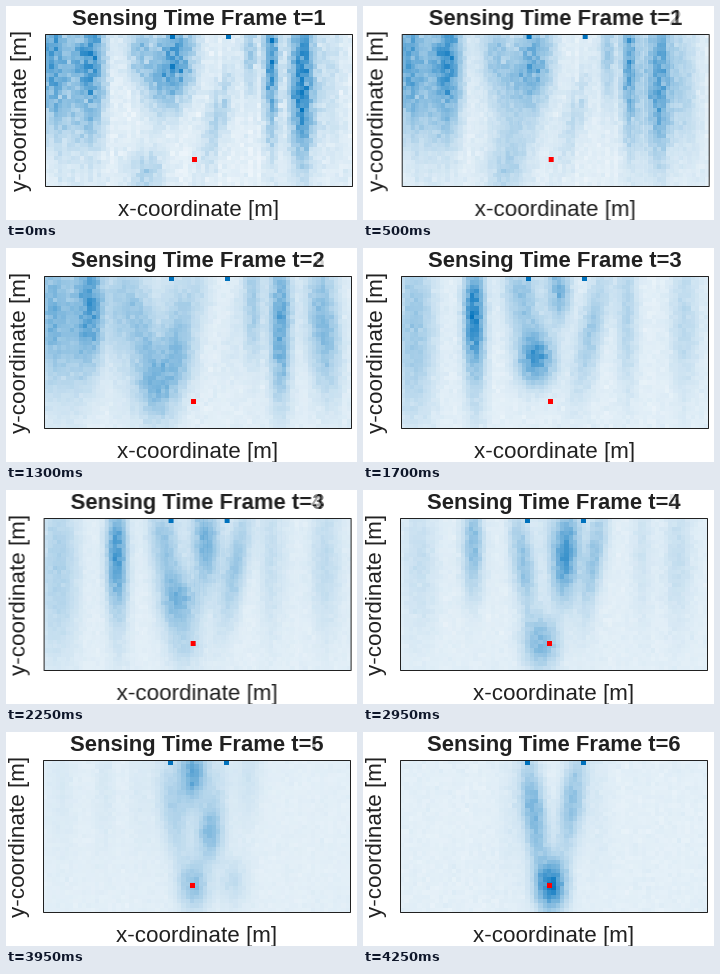
Write a matplotlib script that moves like this. It is 351 by 214 pixels and loops after 6.25 s.

```python
import numpy as np
import matplotlib.pyplot as plt
from matplotlib.animation import FuncAnimation
from matplotlib.patches import Rectangle

W, H = 351, 214
LEFT, TOP, BW, BH = 39, 28, 307, 152
COLS, ROWS = 71, 35
BLUE = np.array([0, 0.447, 0.741])
INK = "#212121"
STEP = 50             # ms per frame
HOLD, FADE = 7, 10    # frames of rest and of cross-fade
SCENES = 6

rng = np.random.default_rng(4)
gx, gy = np.meshgrid(LEFT + (np.arange(COLS) + 0.5) * BW / COLS,
                     TOP + (np.arange(ROWS) + 0.5) * BH / ROWS)


def blob(amp, x, y, sx, sy, slant=0):
    """Gaussian plume; slant is the sideways drift per pixel downwards."""
    u = (gx - x - slant * (gy - y)) / sx
    return amp * np.exp(-(u * u + ((gy - y) / sy) ** 2) / 2)


def field(t):
    if t == 1:
        return (blob(.48, 45, 50, 8, 48) + blob(.54, 86, 55, 9, 50)
                + blob(.3, 65, 65, 12, 52) + blob(.3, 135, 45, 10, 30, .15)
                + blob(.64, 168, 58, 13, 28, -.1) + blob(.2, 139, 166, 12, 16)
                + blob(.2, 212, 108, 8, 35, -.22) + blob(.26, 244, 45, 5, 30)
                + blob(.62, 265, 55, 5, 52) + blob(.72, 296, 75, 8, 54)
                + blob(.12, 322, 65, 9, 52))
    if t == 2:
        return (blob(.42, 46, 60, 10, 50) + blob(.68, 86, 55, 9, 42)
                + blob(.26, 68, 80, 11, 50) + blob(.34, 132, 70, 12, 38, .15)
                + blob(.42, 151, 135, 15, 28) + blob(.28, 176, 80, 11, 40, -.1)
                + blob(.3, 248, 55, 6, 42) + blob(.62, 276, 75, 7, 54)
                + blob(.42, 318, 75, 11, 48, .08))
    if t == 3:
        return (blob(.28, 52, 80, 14, 62) + blob(.74, 112, 65, 7, 36)
                + blob(.12, 114, 130, 8, 40)
                + blob(.3, 160, 50, 12, 30, .1) + blob(.4, 197, 42, 8, 22)
                + blob(.6, 174, 110, 12, 18)
                + blob(.24, 230, 80, 9, 46, -.2) + blob(.2, 265, 65, 7, 52)
                + blob(.16, 323, 70, 10, 50))
    if t == 4:
        return (blob(.12, 59, 70, 12, 52) + blob(.38, 112, 55, 7, 34)
                + blob(.31, 162, 72, 8, 36, .12) + blob(.66, 205, 63, 9, 29, -.08)
                + blob(.31, 233, 68, 7, 38, -.15) + blob(.42, 180, 153, 12, 17)
                + blob(.09, 281, 60, 7, 48) + blob(.13, 317, 65, 10, 48))
    if t == 5:
        return (blob(.85, 189, 40, 9, 21) + blob(.48, 206, 102, 9, 17)
                + blob(.2, 229, 150, 10, 17) + blob(.13, 162, 70, 7, 36, .1)
                + blob(.12, 245, 45, 9, 30) + blob(.08, 101, 60, 7, 42)
                + blob(.06, 57, 60, 11, 45) + blob(.06, 135, 60, 7, 42))
    return (blob(.42, 173, 80, 8, 35, .1) + blob(.32, 211, 70, 8, 35, -.12)
            + blob(.76, 190, 153, 10, 17)
            + blob(.04, 150, 80, 9, 50) + blob(.04, 236, 70, 9, 50))


def heat(t):
    noise = rng.standard_normal((2, ROWS, COLS))
    v = 0.11 + field(t) * (1 + (0.06 + 0.14 / t) * noise[0])
    v += (0.006 + 0.014 / t) * noise[1]
    v += 0.01 / t * rng.standard_normal(COLS)
    return 1 - np.clip(v, 0.07, 1)[..., None] * (1 - BLUE)


fig = plt.figure(figsize=(W / 100, H / 100), dpi=100, facecolor="white")
ax = fig.add_axes([0, 0, 1, 1])


def stage():
    ax.clear()
    ax.axis("off")


def limits():
    ax.set(xlim=(0, W), ylim=(H, 0), aspect="auto")


def label(x, y, s, px, **kw):
    ax.text(x, y, s, fontsize=px * 0.72, family="Liberation Sans", color=INK,
            ha="center", va="baseline", rotation_mode="anchor", **kw)


def square(x, y, size, color):
    ax.add_patch(Rectangle((x, y), size, size, fc=color, ec="none", zorder=3))


def snapshot(t):
    dx = (0, -1, -1, -2, -2, -2)[t - 1]
    x0 = LEFT + dx
    stage()
    ax.imshow(heat(t), extent=(x0, x0 + BW, TOP + BH, TOP),
              interpolation="nearest")
    for x in (164, 220):
        square(x + dx, 28, 5, BLUE)
    square(186 + dx, 151, 5, "red")
    ax.add_patch(Rectangle((x0, TOP), BW, BH, fill=False, ec=INK, lw=0.72,
                           zorder=4))
    label(192.5 + dx, 19.4, f"Sensing Time Frame t={t}", 22, weight="bold")
    label(192.7 + dx, 209.6, "x-coordinate [m]", 22.4)
    label(21.5 + dx, 104.5, "y-coordinate [m]", 22.4, rotation=90)
    limits()
    fig.canvas.draw()
    return np.asarray(fig.canvas.buffer_rgba())[..., :3] / 255.0


shots = [snapshot(t) for t in range(1, SCENES + 1)]

stage()
view = ax.imshow(shots[0], extent=(0, W, H, 0), interpolation="nearest")
limits()


def update(i):
    span, last = HOLD + FADE, SCENES - 1
    k = min(i // span, last)
    p = max(0, i - k * span - HOLD) / FADE if k < last else 0
    view.set_data((1 - p) * shots[k] + p * shots[min(k + 1, last)])
    return [view]


anim = FuncAnimation(fig, update, frames=125, interval=STEP, repeat=True,
                     repeat_delay=0, blit=False)
plt.show()
```
